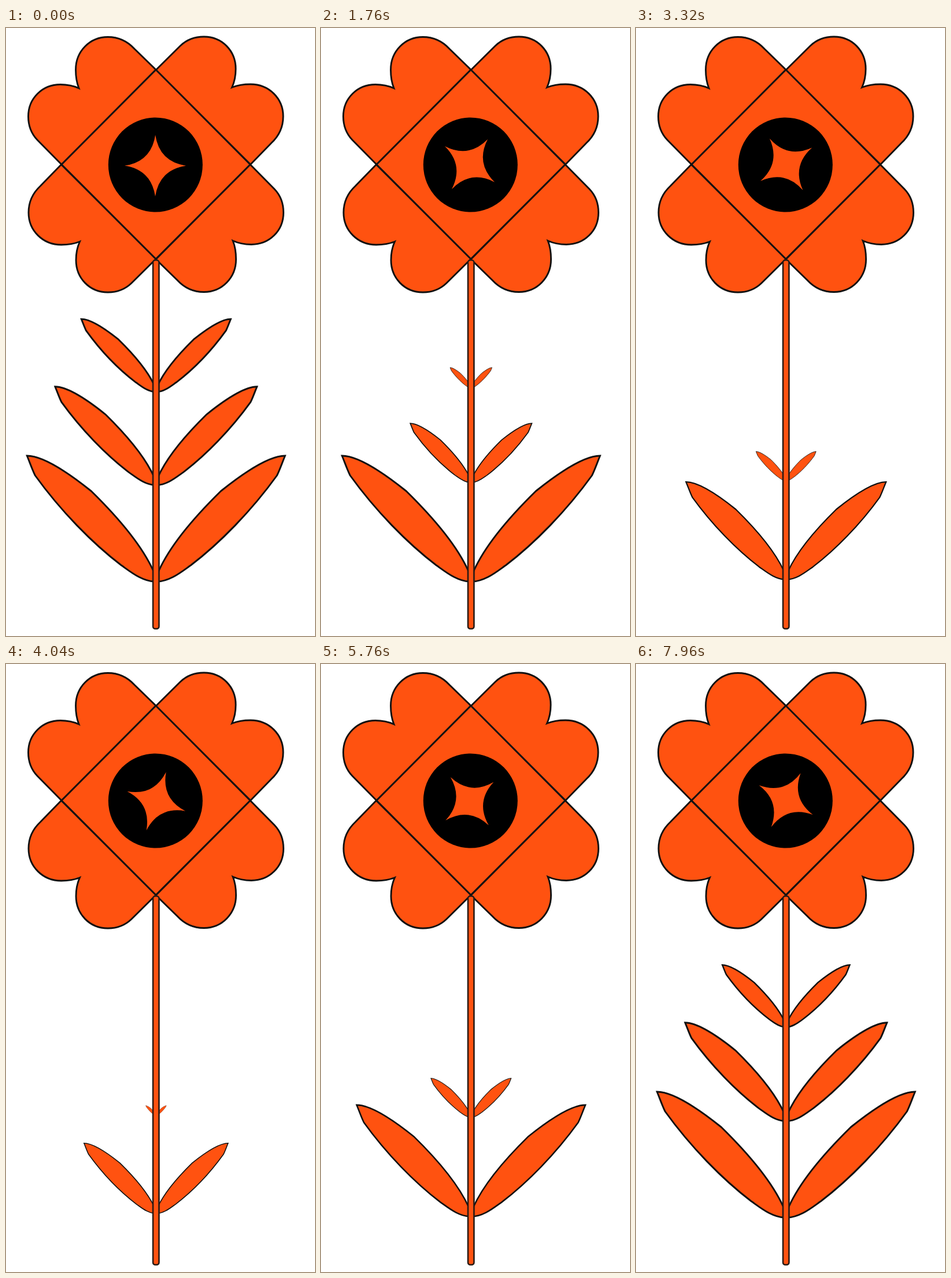
An HTML page that plays this animation: 534x1049 px, repeating every 8 s.

```html
<!DOCTYPE html>
<html>
<head>
<meta charset="utf-8">
<style>
  html, body { margin: 0; width: 100%; height: 100%; overflow: hidden; background: #fff; }
  svg { display: block; width: 534px; height: 1049px; }
</style>
</head>
<body>
<svg viewBox="0 0 534 1049" fill="#ff5210" stroke="#111" stroke-width="2.9">
  <defs>
    <path id="petal" d="M96 235.5L54 193C43.5 182 38.5 167 38.5 152.5C38.5 121 63 97.5 94 97.5C105 97.5 116 99.5 126 104
      C122 94 120.5 83 120.5 72C120.5 40 145 15.5 176 15.5C194 15.5 210 23 222 36L259 72Z"/>
    <path id="leaf" d="M-223-201C-196-201-152-172-112-140C-66-95-24-45-5-3L0 16
      C-24 17-48-4-60-12C-110-50-165-106-209-167C-214-177-218-189-223-201Z"/>
  </defs>
  <g id="leaves"></g>
  <g id="petals"></g>
  <path d="M96 235.5L259 72L422 235.5L259 398.5Z"/>
  <circle cx="258.3" cy="236" r="81.5" fill="#000" stroke="none"/>
  <path id="star" stroke="none" d="M0-53Q7-7 53 0Q7 7 0 53Q-7 7-53 0Q-7-7 0-53Z"/>
  <rect x="254" y="400.5" width="10.4" height="636" rx="4" stroke="#2a1a14" stroke-width="2.6"/>
</svg>
<script>
const LOOP = 8000, LEAF_PERIOD = 2480, SPIN_PERIOD = 5040;
const byId = id => document.getElementById(id);

byId('petals').innerHTML = [0, 90, 180, 270]
  .map(a => `<use href="#petal" transform="rotate(${a} 259 235.5)"/>`).join('');

// Each pair shrinks linearly from start to end, then grows back mirrored in time.
const pairs = [
  { y: 618.5, size: 0.579, shift: 0, start: 470, end: 816 },
  { y: 778, size: 0.782, shift: -2, start: 560, end: 960 },
  { y: 939, size: 1, shift: 0, start: 760, end: 1120 }
];
byId('leaves').innerHTML = pairs.map(({ size, shift }) => {
  const side = dir => `<use href="#leaf" transform="translate(0 ${shift}) scale(${dir * size} ${size})"/>`;
  return `<g stroke-width="${2.9 / size}">${side(1)}${side(-1)}</g>`;
}).join('');
const groups = [...byId('leaves').children];
const star = byId('star');

function draw(now) {
  const t = now % LOOP;
  const phase = t % LEAF_PERIOD;
  const folded = Math.min(phase, LEAF_PERIOD - phase);
  pairs.forEach(({ y, start, end }, i) => {
    const scale = Math.max(0, Math.min(1, (end - folded) / (end - start)));
    groups[i].setAttribute('transform', `translate(259.3 ${y}) scale(${scale})`);
    groups[i].setAttribute('visibility', scale > 0 ? 'visible' : 'hidden');
  });
  const angle = 360 * t / SPIN_PERIOD;
  star.setAttribute('transform', `translate(258.2 236) rotate(${angle}) translate(-0.2 1.6)`);
}

const begin = performance.now();
function tick() {
  draw(performance.now() - begin);
  requestAnimationFrame(tick);
}
tick();
</script>
</body>
</html>
```
